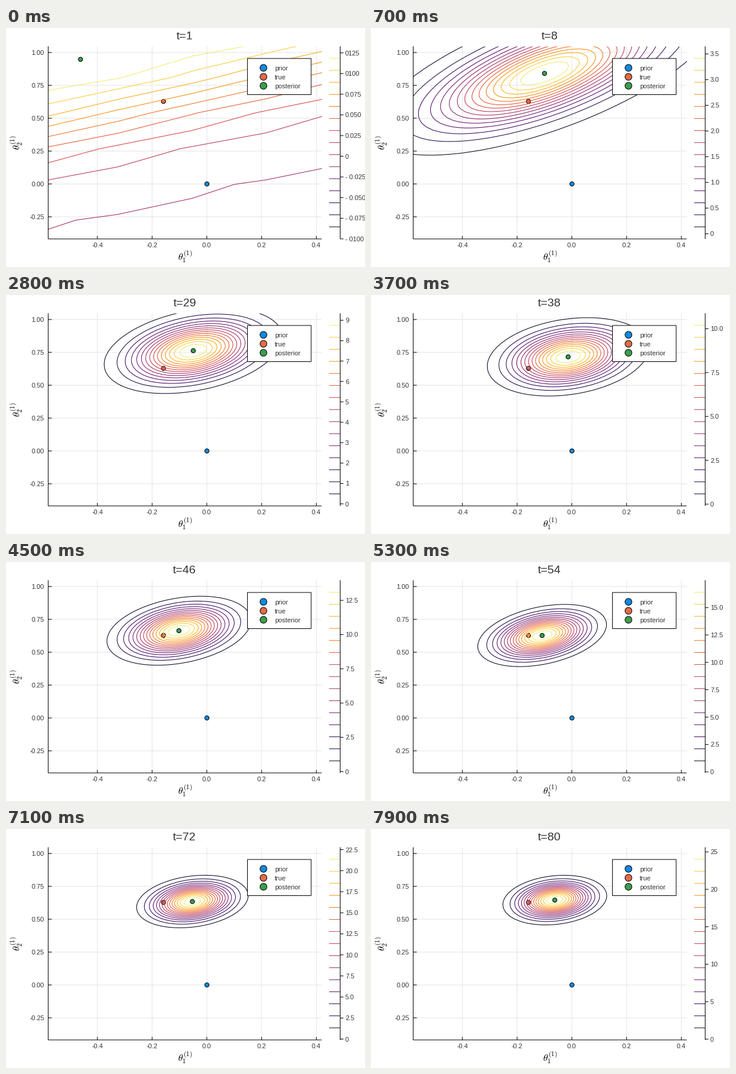
Recreate the animation shown at these times as a matplotlib script. Size 600 by 400 pixels, loop 8 s.

```python
import numpy as np
import matplotlib as mpl
import matplotlib.pyplot as plt
from matplotlib.animation import FuncAnimation
from matplotlib.patches import Circle, Rectangle

mpl.rcParams["font.family"] = "Liberation Sans"
mpl.rcParams["mathtext.fontset"] = "cm"
mpl.rcParams["path.snap"] = False

FRAMES, INTERVAL = 80, 100
PX = 0.72                      # points per pixel at 100 dpi
X0, Y0 = 335.7, 261.0          # pixel position of the data origin
KX, KY = 457.5, 220.0          # pixels per data unit
LEFT, RIGHT, TOP, BOTTOM = 70.5, 527.5, 30.5, 353.0
Z_MIN, N_LEVELS = -0.1, 15
INK = "#333333"
BLUE, ORANGE, GREEN = "#108ae0", "#e26b48", "#3a9f4a"

# step, mean x, mean y, sigma x, sigma y, correlation (pixels)
KEYS = np.array([
    (1, 124.5, 52.5, 1303, 306.5, 0.955),
    (8, 290, 76, 111, 53.2, 0.67),
    (20, 329.5, 84, 70.85, 33.07, 0.40),
    (28, 311, 92, 62, 29.8, 0.33),
    (38, 329.5, 103.5, 55.85, 27.1, 0.24),
    (46, 289, 115, 50, 24, 0.30),
    (54, 286, 123, 44.9, 21.73, 0.35),
    (63, 295.7, 125.5, 41.67, 19.79, 0.26),
    (73, 313, 121, 38.8, 18.3, 0.22),
    (80, 307.2, 119, 36.4, 17.43, 0.18),
])


def information(row):
    """Precision matrix and precision-weighted mean of one key."""
    _, mx, my, sx, sy, r = row
    cov = np.array([[sx * sx, -r * sx * sy], [-r * sx * sy, sy * sy]])
    prec = np.linalg.inv(cov)
    return prec, prec @ (mx, my)


INFO = [information(row) for row in KEYS]


def posterior(t):
    """Mean and precision at step t; evidence accumulates linearly."""
    i = min(np.searchsorted(KEYS[:, 0], t, side="right") - 1, len(KEYS) - 2)
    a = (t - KEYS[i, 0]) / (KEYS[i + 1, 0] - KEYS[i, 0])
    (p, h), (p2, h2) = INFO[i], INFO[i + 1]
    prec = (1 - a) * p + a * p2
    return np.linalg.solve(prec, (1 - a) * h + a * h2), prec


def density(mean, prec):
    """Gaussian density on an even grid centred on the mean."""
    cov = np.linalg.inv(prec)
    sigma = max(np.sqrt(cov[0, 0]) / KX, np.sqrt(cov[1, 1]) / KY)
    g = (np.arange(68) - 33.5) * 0.0954 * sigma
    u, v = np.meshgrid(g * KX, g * KY)
    q = prec[0, 0] * u * u + 2 * prec[0, 1] * u * v + prec[1, 1] * v * v
    peak = KX * KY * np.sqrt(np.linalg.det(prec)) / (2 * np.pi)
    return mean[0] + u, mean[1] + v, peak * np.exp(-q / 2)


def tick_step(span):
    for e in range(-3, 3):
        for m in (1, 2.5, 5):
            if span / (m * 10.0 ** e) <= 10:
                return m * 10.0 ** e


def tick_label(v, step):
    if abs(v) < step / 2:
        return "0"
    digits = next(d for d in range(4) if abs(round(step, d) - step) < 1e-9)
    s = f"{abs(v):.{digits}f}"
    if digits == 3:
        s = s.replace("0.1", "01")
    return "- " + s if v < 0 else s


fig = plt.figure(figsize=(6, 4), dpi=100, facecolor="white")
ax = fig.add_axes([0, 0, 1, 1])
ax.set_xlim(0, 600)
ax.set_ylim(400, 0)
ax.axis("off")


def line(xs, ys, color="black", z=5):
    return ax.plot(xs, ys, color=color, lw=PX, zorder=z,
                   solid_capstyle="butt")[0]


def label(x, y, s, size=11, ha="center", **kw):
    return ax.text(x, y, s, fontsize=size * PX, ha=ha,
                   color=kw.pop("color", INK), zorder=9, **kw)


def dot(x, y, color, r=3.6, z=3):
    return ax.add_patch(Circle((x, y), r, fc=color, ec="black",
                               lw=PX, zorder=z))


# axes, grid and ticks
for v in (-0.4, -0.2, 0.0, 0.2, 0.4):
    x = X0 + KX * v
    line([x, x], [TOP, BOTTOM], "#e4e4e4", 1)
    line([x, x], [BOTTOM, BOTTOM - 5])
    label(x, 367, f"{v:.1f}")
for v in (-0.25, 0.0, 0.25, 0.5, 0.75, 1.0):
    y = Y0 - KY * v
    line([LEFT, RIGHT], [y, y], "#e4e4e4", 1)
    line([LEFT, LEFT + 6], [y, y])
    label(64, y + 4, f"{v:.2f}", ha="right")
line([LEFT, LEFT], [TOP, BOTTOM])
line([LEFT, RIGHT], [BOTTOM, BOTTOM])
label(299, 383, r"$\theta_1^{(1)}$", 16, va="center", color="black")
label(17.5, 192, r"$\theta_2^{(1)}$", 16, va="center", color="black",
      rotation=90)

# legend
ax.add_patch(Rectangle((403.5, 51), 106.5, 60.5, fc="white", ec="black",
                       lw=PX, zorder=7))
for y, color, name in ((66.7, BLUE, "prior"), (81.7, ORANGE, "true"),
                       (96.7, GREEN, "posterior")):
    dot(430.3, y, color, 5.7, 8)
    label(449.2, y + 4.3, name, ha="left")

# colour bar
COLORS = [mpl.colormaps["inferno"](k / 16) for k in range(1, N_LEVELS + 1)]
for k, c in enumerate(COLORS, 1):
    y = BOTTOM - k * (BOTTOM - TOP) / 16
    line([540, 558], [y, y], c)
line([558.5, 558.5], [TOP, BOTTOM])

dot(335.8, 261, BLUE)
dot(263.2, 122.8, ORANGE)
post = dot(0, 0, GREEN)
title = label(298.5, 18.7, "", 19.5)
clip = Rectangle((LEFT, TOP), RIGHT - LEFT, BOTTOM - TOP,
                 transform=ax.transData)
live = []


def update(i):
    while live:
        live.pop().remove()
    t = i + 1
    mean, prec = posterior(t)
    x, y, z = density(mean, prec)
    span = z.max() - Z_MIN
    levels = Z_MIN + span * np.arange(1, N_LEVELS + 1) / 16
    cs = ax.contour(x, y, z, levels=levels, colors=COLORS,
                    linewidths=PX * 1.05, zorder=4)
    cs.set_clip_path(clip)
    live.append(cs)

    step = tick_step(span)
    for n in range(int(np.ceil(Z_MIN / step - 1e-6)),
                   int(np.floor(z.max() / step)) + 1):
        ty = BOTTOM - (n * step - Z_MIN) / span * (BOTTOM - TOP)
        live.append(line([558.5, 564], [ty, ty]))
        live.append(label(567, ty + 4, tick_label(n * step, step), ha="left"))

    post.center = tuple(mean)
    title.set_text(f"t={t}")
    return []


anim = FuncAnimation(fig, update, frames=FRAMES, interval=INTERVAL,
                     init_func=lambda: [], repeat=True, repeat_delay=0)
plt.show()
```
